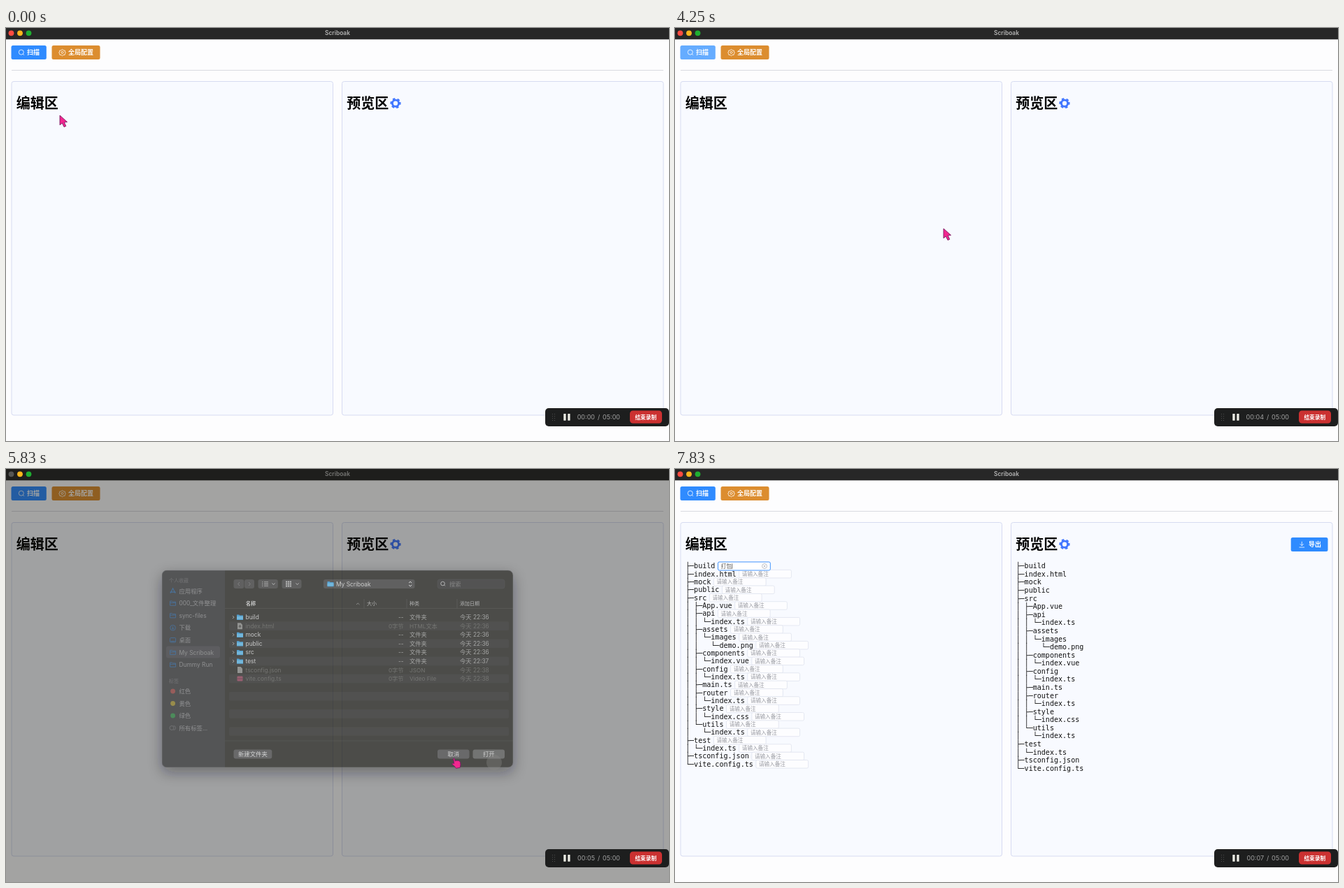
An HTML page for the animation above (8 s loop, 948 px wide and 591 px high).

```html
<!DOCTYPE html>
<html lang="zh">
<head>
<meta charset="utf-8">
<title>Scriboak</title>
<style>
html, body { margin: 0; width: 100%; height: 100%; overflow: hidden; background: #fdfdfe; }
svg { display: block; width: 948px; height: 591px; font-family: Inter, 'Noto Sans CJK SC', sans-serif; }
.mono { font-family: 'DejaVu Sans Mono', monospace; white-space: pre; }
.serif { font-family: 'Noto Serif', serif; }
</style>
</head>
<body>
<svg id="stage" viewBox="0 0 948 591" xmlns="http://www.w3.org/2000/svg"></svg>
<script>
const APP = 'Scriboak';
const BLUE = '#2f8bff', ICON = '#0a84ff', GREY = '#b9bbbb';

// Shape helpers; text is placed by its vertical centre
const rect = (x, y, w, h, r, fill, more = '') =>
  `<rect x="${x}" y="${y}" width="${w}" height="${h}" rx="${r}" fill="${fill}" ${more}/>`;
const circ = (x, y, r, fill, more = '') => `<circle cx="${x}" cy="${y}" r="${r}" fill="${fill}" ${more}/>`;
const ring = (x, y, r, stroke, w = 1, more = '') =>
  circ(x, y, r, 'none', `stroke="${stroke}" stroke-width="${w}" ${more}`);
const line = (d, stroke, w = 1, more = '') =>
  `<path d="${d}" fill="none" stroke="${stroke}" stroke-width="${w}" ${more}/>`;
const text = (x, y, size, str, fill, more = '') =>
  `<text x="${x}" y="${y + size * 0.37}" font-size="${size}" fill="${fill}" ${more}>${str}</text>`;
const BOLD = 'font-weight="700"', END = 'text-anchor="end"', MID = 'text-anchor="middle"';
const group = (id, body, more = '') => `<g id="${id}" ${more}>${body}</g>`;

const search = (x, y, r, c, w = 0.9) =>
  ring(x, y, r, c, w) + line(`M${x + r * .7} ${y + r * .7}l${r * .5} ${r * .5}`, c, w);

function page() {
  const panel = x => rect(x, 76.5, 459.5, 477.5, 3, '#f8faff', 'stroke="#d6dbf1"');
  const gear = ring(557, 107.7, 4.6, '#4176ff', 2.9) +
    ring(557, 107.7, 6.5, '#4176ff', 2.2, 'stroke-dasharray="3.6 3.207" transform="rotate(-14 557 107.7)"');
  return rect(0, 0, 948, 591, 0, '#fdfdfe') +
    rect(7.5, 25, 50.3, 20, 2.5, BLUE, 'id="scan"') + search(21.8, 34.7, 3.5, '#fff', .8) +
    text(30, 35, 9, '扫描', '#fff', BOLD) +
    rect(65.5, 25, 69, 20, 2.5, '#dc8d2f') +
    line('M80.5 30.6l1.6 1.3 2.2 .4.1 2.1 1 .6-1 1.7-.3 1.7-2.2.2-1.4 1.2-1.4-1.2-2.2-.2-.3-1.7-1-1.7 1-.6.1-2.1 2.2-.4z', '#fff', .8) +
    ring(80.5, 35, 1.5, '#fff', .8) +
    text(89, 35, 9, '全局配置', '#fff', BOLD) +
    line('M8 60.5H940', '#d9dae0') + panel(8) + panel(480.5) +
    text(14.7, 107.7, 20, '编辑区', '#000', BOLD) + text(487.3, 107.7, 20, '预览区', '#000', BOLD) + gear;
}

const TREE = `├─build
├─index.html
├─mock
├─public
├─src
│ ├─App.vue
│ ├─api
│ │ └─index.ts
│ ├─assets
│ │ └─images
│ │   └─demo.png
│ ├─components
│ │ └─index.vue
│ ├─config
│ │ └─index.ts
│ ├─main.ts
│ ├─router
│ │ └─index.ts
│ ├─style
│ │ └─index.css
│ └─utils
│   └─index.ts
├─test
│ └─index.ts
├─tsconfig.json
└─vite.config.ts`.split('\n');

function tree() {
  const row = (x, y, s) => text(x, y, 10.05, s.replace(/ /g, '\u00a0'), '#111', 'class="mono"');
  let out = '';
  TREE.forEach((s, i) => {
    const y = 138.6 + i * 11.34, x = 19 + s.length * 6.05;
    out += rect(x, y - 5.6, 74.8, 11.6, 2, '#fdfdff', 'stroke="#dfe2ee" stroke-width=".8"');
    if (i) out += text(x + 4.2, y + .2, 7.6, '请输入备注', '#999ba2');
  });
  TREE.forEach((s, i) => {
    out += row(15, 138.6 + i * 11.34, s) + row(487.5, 138.6 + i * 11.58, s);
  });
  return out +
    rect(61.5, 133, 74.8, 12, 2, '#fff', `id="focus" stroke="${BLUE}" stroke-width=".9"`) +
    text(65.6, 139, 7.7, '', '#555', 'id="note"') +
    line('M0 135.4v7.4', '#333', .7, 'id="caret"') +
    group('clear', ring(128, 139, 3.5, '#a4a8b2', .7) + line('M126.7 137.7l2.6 2.6m0-2.6l-2.6 2.6', '#a4a8b2', .7)) +
    rect(880.7, 98, 52.8, 20, 2.5, BLUE) +
    line('M896.3 103.8v5.8m-2.6-2.4l2.6 2.6 2.6-2.6M892.5 112h7.6', '#fff', .8) +
    text(906, 108, 9, '导出', '#fff', BOLD);
}

function dialog() {
  const folder = (x, y) => `<path d="M${x - 4.5} ${y - 3.5}h3.2l1 1h4.8v6.3h-9z" fill="#2aa3ee"/>` +
    rect(x - 4.5, y - 1.2, 9, 4.2, .6, '#5cc4fb');
  const outline = (x, y) => line(`M${x - 4} ${y - 3}h2.8l1 1h4.2v5.2h-8zM${x - 4} ${y - .6}h8`, ICON, .9);
  const button = (x, w, s, id = '', fill = '#4a4a4b') =>
    rect(x, 411, w, 13, 3, fill, id) + text(x + w / 2, 417.5, 8.4, s, '#f2f2f2', MID);

  let out = rect(223, 154.5, 502, 282, 7, '#1a1a18', 'filter="url(#glow)"') +
    `<path d="M313 154.5h-83a7 7 0 0 0-7 7v268a7 7 0 0 0 7 7h83z" fill="#28292b"/>`;

  let side = text(233, 169, 7, '个人收藏', '#8b8b8b') + text(233, 312.5, 7, '标签', '#8b8b8b');
  ['应用程序', '000_文件整理', 'sync-files', '下载', '桌面', 'My ' + APP, 'Dummy Run'].forEach((s, i) => {
    const y = 184 + i * 17.58, x = 238.6;
    if (i == 5) side += rect(229, y - 8.8, 77, 17, 3, '#464649');
    side += i == 0 ? line(`M${x - 3.5} ${y + 3.3}L${x} ${y - 3.8}l3.5 7.1M${x - 4} ${y + 1.6}h8`, ICON, 1.1)
      : i == 3 ? ring(x, y, 3.8, ICON, .9) + line(`M${x} ${y - 2}v4m-1.6-1.6l1.6 1.6 1.6-1.6`, ICON, .9)
      : i == 4 ? rect(x - 4, y - 3.2, 8, 6.4, 1, 'none', `stroke="${ICON}" stroke-width=".9"`) + line(`M${x - 3} ${y + 1.8}h6`, ICON, 1)
      : outline(x, y);
    side += text(247.5, y, 8.4, s, '#e4e4e4');
  });
  ['红色', '黄色', '绿色'].forEach((s, i) => {
    const y = 327.5 + i * 17.5;
    side += circ(238.6, y, 3.4, ['#ff443a', '#ffd60a', '#12d43a'][i]) + text(247.5, y, 8.4, s, '#e4e4e4');
  });
  side += ring(237, 380, 3, '#999', .8) + line('M239.5 377a3 3 0 0 1 0 6', '#999', .8) +
    text(247.5, 380, 8.4, '所有标签...', '#e4e4e4');
  out += group('side', side);

  const box = (x, w) => rect(x, 167.5, w, 13, 3, '#3b3b3a');
  const down = x => line(`M${x - 2} 173l2 2 2-2`, '#ccc', 1);
  out += box(325.5, 14.8) + box(341, 14) + line('M334 171.5l-2.3 2.5 2.3 2.5M347 171.5l2.3 2.5-2.3 2.5', '#777', .9) +
    box(360.5, 28.3) + line('M369 171.3h6M369 174h6M369 176.7h6', '#ccc', .9) +
    line('M366 171.3h1.4M366 174h1.4M366 176.7h1.4', '#ccc', .9) + down(382.5) +
    box(394.5, 28) + line('M400 171h8M400 174h8M400 177h8', '#ccc', 2, 'stroke-dasharray="2.2 .7"') + down(416.5) +
    box(454, 130.5) + folder(464, 174) + text(472, 174, 8.4, 'My ' + APP, '#e8e8e8') +
    rect(573, 168.5, 10.3, 11, 2.5, '#1c6ff0', 'id="pop"') + line('M576 172.6l2.1-2 2.1 2M576 175.4l2.1 2 2.1-2', '#fff', 1) +
    rect(617, 167.5, 96, 13, 3, '#272726', 'stroke="#333" stroke-width=".6"') + search(624.5, 173.5, 2.8, '#ccc') +
    text(634, 174, 8.4, '搜索', '#777');

  out += text(343, 202.2, 7, '名称', '#e4e4e4', BOLD) + line('M501 203.5l2.2-2 2.2 2', '#999', .8);
  [[516, '大小'], [577, '种类'], [649, '添加日期']].forEach(([x, s]) => {
    out += text(x, 202.2, 7, s, '#bdbdbd') + line(`M${x - 4} 195.5v13`, '#3a3a38', .8);
  });
  out += line('M313 209H725', '#34342f', .8);
  for (let i = 1; i < 14; i += 2) out += rect(319, 215.3 + i * 12.57, 400, 12.57, 2, '#242421');

  [['build'], ['index.html', 'HTML文本'], ['mock'], ['public'], ['src'], ['test'],
   ['tsconfig.json', 'JSON'], ['vite.config.ts', 'Video File']].forEach(([name, kind], i) => {
    const y = 221.6 + i * 12.57, c = kind ? '#5c5c58' : '#dedede', c2 = kind ? '#5c5c58' : '#a9a9a7';
    out += !kind ? line(`M324 ${y - 2}l2 2-2 2`, '#bbb', .9) + folder(334.5, y)
      : i == 7 ? rect(330.5, y - 3.5, 8, 7, 1, '#963a55') + line(`M330.5 ${y}h8`, '#5c2436', 1)
      : `<path d="M331 ${y - 4.5}h4.5l2.5 2.5v6.5h-7z" fill="#8d8d89"/>` + (i == 1 ? circ(334.5, y + .5, 1.8, '#4b4b49') : '');
    out += text(342.5, y, 8.4, name, c) + text(568.5, y, 8.2, kind ? '0字节' : '--', c2, END) +
      text(577, y, 8.2, kind || '文件夹', c2) + text(649, y, 8.3, '今天 22:3' + (i == 5 ? 7 : i > 5 ? 8 : 6), c2);
  });
  return out + line('M313 398.5H725', '#2f2f2c', .8) + button(325.5, 54.8, '新建文件夹') + button(617, 45.5, '取消') +
    button(667.5, 45.5, '打开', 'id="open"', '#1f69f3') +
    rect(223, 154.5, 502, 282, 7, 'none', 'stroke="#77777a" stroke-opacity=".6" stroke-width=".8"');
}

function tools() {
  let out = rect(259, 312, 38, 300, 5, '#3b3d3d', 'filter="url(#shade)"') +
    rect(259, 312, 38, 300, 5, 'none', 'stroke="#5a5c5c" stroke-width=".7"') +
    ring(266, 320, 4, GREY, .9) + line('M264.6 318.6l2.8 2.8m0-2.8l-2.8 2.8', GREY, .9) +
    line('M274.5 317l2-1.5 2 3 3.5 2-2.5 3-2-3.5z', GREY, .9) +
    ring(290, 320, 4, GREY, .9) + line('M288 320h4.2', GREY, 1, 'stroke-dasharray="1 .6"') +
    line('M270.5 339c3-5 9-4 7 1-2 4-5 6-3 8 3 2 7-4 11.500-5', '#3fa9f5', 1.6, 'stroke-linecap="round"') +
    line('M271 381l14-14m-8.500 0h8.500v8.500', GREY, 1.4) +
    rect(271, 398.700, 14, 13.800, .5, 'none', `stroke="${GREY}" stroke-width="1.4"`) +
    text(278, 437.600, 19, 'T', GREY, MID + ' class="serif"') +
    line('M265 455.700H290.500M265 548H290.500', '#6b6d6d', .8) +
    line('M265 484H290.500', '#777', .8, 'stroke-dasharray="1 1"') +
    circ(269.500, 470, 1.700, '#3fa9f5') + ring(275.300, 470, 2.700, GREY, 1.200) + ring(283.600, 470, 4, GREY, 1.200);
  for (let i = 0; i < 6; i++) {
    out += ring(278, 501.500, 6.700, `hsl(${i * 60} 85% 60%)`, 2.200,
      `stroke-dasharray="6 36.1" transform="rotate(${i * 60} 278 501.5)"`);
  }
  return out + ring(278, 531, 7.600, GREY, 1.300) + `<path d="M274.500 525.800l8.700 5.200-8.700 5.200z" fill="${GREY}"/>` +
    ring(278, 565, 7.400, GREY, 1.300) + line('M275.500 555h5M278 555v3M278 565l3-3.500M284 558l1.500 1.500', GREY, 1.200) +
    line('M266 562.500l-2.500 2.500 2.500 2.500M290.500 562.500l2.500 2.500-2.500 2.500', '#888', .8) +
    line('M263 584l1.500 4.500h4l1.500-5M264.500 585v-3m1.800 2.500v-3.300m1.800 3.500v-3', GREY, 1.300) +
    rect(275.200, 582.500, 5.600, 5.500, .5, 'none', `stroke="${GREY}" stroke-width=".9"`) +
    line('M287 582l6 5m0-5l-6 5', GREY, .9) + ring(287, 588, 1.300, GREY, .8) + ring(293, 588, 1.300, GREY, .8);
}

function recorder() {
  let out = rect(771, 544, 177, 26, 5, '#1d1e1e');
  for (let i = 0; i < 8; i++) out += circ(781.500 + i % 2 * 3, 552.500 + (i >> 1) * 3, .6, '#555');
  return out + rect(797.300, 552, 3.300, 9.700, .4, '#ecece4') + rect(803.300, 552, 3.300, 9.700, .4, '#ecece4') +
    text(842, 557, 9, '', '#a3a3a3', END + ' id="clock"') + text(847.500, 557, 9, '/', '#a3a3a3', MID) +
    text(878, 557, 9, '05:00', '#a3a3a3', END) +
    rect(892, 547.500, 46, 18.300, 4.500, '#cb3131') + text(914.800, 556.800, 7.700, '结束录制', '#fff', MID + ' ' + BOLD);
}

const pen = (id, d) => line(d, '#36cffc', 5.5, `id="${id}" pathLength="1" stroke-linecap="round"`);
const pink = 'fill="#f2278f" stroke="#7b1b66" stroke-width=".9" stroke-linejoin="round"';
const $ = id => document.getElementById(id);

$('stage').innerHTML = `<defs>
  <filter id="shade" x="-1.5" y="-.3" width="4" height="1.6"><feDropShadow dx="0" dy="2" stdDeviation="9" flood-color="#1c1c14" flood-opacity=".8"/></filter>
  <filter id="glow" x="-.2" y="-.2" width="1.4" height="1.5"><feDropShadow dx="0" dy="7" stdDeviation="10" flood-color="#0c0c1c" flood-opacity=".6"/></filter></defs>` +
  page() + group('tree', tree()) +
  rect(0, 0, 948, 16.3, 0, '#272727', 'id="bar"') + text(474, 7.2, 8.4, APP, '#b4b4b4', `id="title" ${MID} font-weight="600"`) +
  rect(0, 0, 948, 591, 0, '#10100d', 'id="dim"') +
  [7.5, 20, 32.5].map((x, i) => circ(x, 7.3, 3.9, '#000', `id="light${i}"`)).join('') +
  group('dialog', dialog()) + group('tools', tools()) +
  pen('pen1', 'M22.500 52C35 53.500 54 55 62 51C70 46 64 30 57 23C50 16 35 17 21 18') +
  pen('pen2', 'M21 18C8 18 4 26 5.500 38C7 48 12 52 24 53') +
  recorder() + circ(698, 420, 11, '#8a8a86', 'id="tap" opacity=".35"') +
  group('arrow', '<path d="M0 0V13.800L3.300 11 6 16.600 8.700 15.400 6.300 9.900 10.500 9.500Z"/>', pink) +
  group('hand', '<path d="M.6 .3C2 -.4 2.700 1 3.300 4L5 3.200 7 3.300 8.800 3.700 10.500 5.300 11 9 10.200 13.300 4.500 14.300 2.500 11.500-1 8.500C-1.500 7 .5 6.800 1.800 7.600Z"/>', pink);

// Pointer keys: step, x, y
const PATH = [[0, 77, 125], [1, 46, 87], [2, 32, 73], [3, 32, 73], [8, 22, 52], [14, 22, 52], [17, 20, 20],
  [22, 24, 53], [24, 24, 53], [31, 272, 555], [34, 272, 555], [40, 40, 62], [42, 40, 62], [44, 38, 37],
  [47, 38, 37], [51, 384, 287], [58, 600, 390], [65, 700, 424], [69, 700, 424], [70, 639, 414],
  [72, 342, 244], [79, 112, 138], [99, 112, 138]];
// Dialog keys: step, dialog opacity, dim, vertical shift
const SHEET = [[51, 0, 0, -10], [53, .6, .35, -5], [55, 1, .66, 0], [68, 1, .66, 0], [69, .9, .58, -3],
  [70, .63, .38, -9.5], [71, .22, .14, -12], [72, 0, 0, -12]];
const TYPED = [[84, 'd'], [85, 'da'], [86, 'da b'], [87, 'da ba'], [88, 'da bao'], [91, '打包']];

function mix(keys, n) {
  if (n <= keys[0][0]) return keys[0].slice(1);
  const i = keys.findIndex(k => k[0] >= n);
  if (i < 0) return keys[keys.length - 1].slice(1);
  const a = keys[i - 1], b = keys[i], f = (n - a[0]) / (b[0] - a[0]);
  return a.slice(1).map((v, j) => v + (b[j + 1] - v) * f);
}
const clamp = v => Math.max(0, Math.min(1, v));
const set = (id, name, v) => $(id).setAttribute(name, v);
const show = (id, on) => set(id, 'visibility', on ? 'visible' : 'hidden');

function stroke(id, f, on) {
  show(id, on && f > 0);
  set(id, 'stroke-dasharray', f + ' 2');
  const p = $(id);
  return p.getPointAtLength(p.getTotalLength() * f);
}

function draw(ms) {
  const n = Math.floor((ms + 5) * 12 / 1000);
  const marking = n >= 4 && n < 35;
  const [alpha, dim, shift] = mix(SHEET, n);

  set('tools', 'opacity', n < 4 || n > 36 ? 0 : Math.min(1, (n - 3) / 3, (37 - n) / 3));
  set('bar', 'fill', marking ? '#1c1c1b' : '#272727');
  set('title', 'fill', marking ? '#707070' : '#b4b4b4');
  ['#ff4b40', '#ffb61c', '#1fae31'].forEach((c, i) =>
    set('light' + i, 'fill', marking ? '#474745' : alpha && !i ? '#565654' : c));
  set('scan', 'fill', n >= 44 && n < 54 ? '#65acff' : BLUE);

  set('dim', 'opacity', dim);
  set('dialog', 'opacity', alpha);
  set('dialog', 'transform', `translate(0 ${shift})`);
  const off = n >= 70;
  set('open', 'fill', off ? '#5a5a58' : '#1f69f3');
  set('pop', 'fill', off ? '#3b3b3a' : '#1c6ff0');
  set('side', 'opacity', off ? .5 : 1);
  show('tap', n >= 67 && n < 71);

  const a = stroke('pen1', clamp((n - 13) / 4), n < 34);
  const b = stroke('pen2', clamp((n - 17) / 5), n < 34);

  show('tree', n >= 74);
  const focused = n >= 83;
  set('focus', 'stroke', focused ? BLUE : '#dfe2ee');
  const word = TYPED.reduce((s, [k, v]) => n >= k ? v : s, '');
  $('note').textContent = word || (focused && n < 84 || n >= 74 ? '请输入备注' : '');
  set('note', 'fill', word ? '#555' : '#999ba2');
  show('caret', focused);
  set('caret', 'transform', `translate(${word ? 66.2 + $('note').getComputedTextLength() : 65.5} 0)`);
  show('clear', word);

  let [x, y] = mix(PATH, n);
  if (n > 13 && n < 17) ({ x, y } = a);
  if (n > 17 && n < 23) ({ x, y } = b);
  const hand = n >= 43 && n < 48 || n >= 64 && n < 71;
  show('arrow', !hand && n < 84);
  show('hand', hand);
  set(hand ? 'hand' : 'arrow', 'transform', `translate(${x} ${y})`);

  $('clock').textContent = '00:0' + Math.max(0, Math.floor((n - 2) / 12));
}

const start = performance.now();
function tick() {
  draw((performance.now() - start) % 8000);
  requestAnimationFrame(tick);
}
tick();
</script>
</body>
</html>
```
